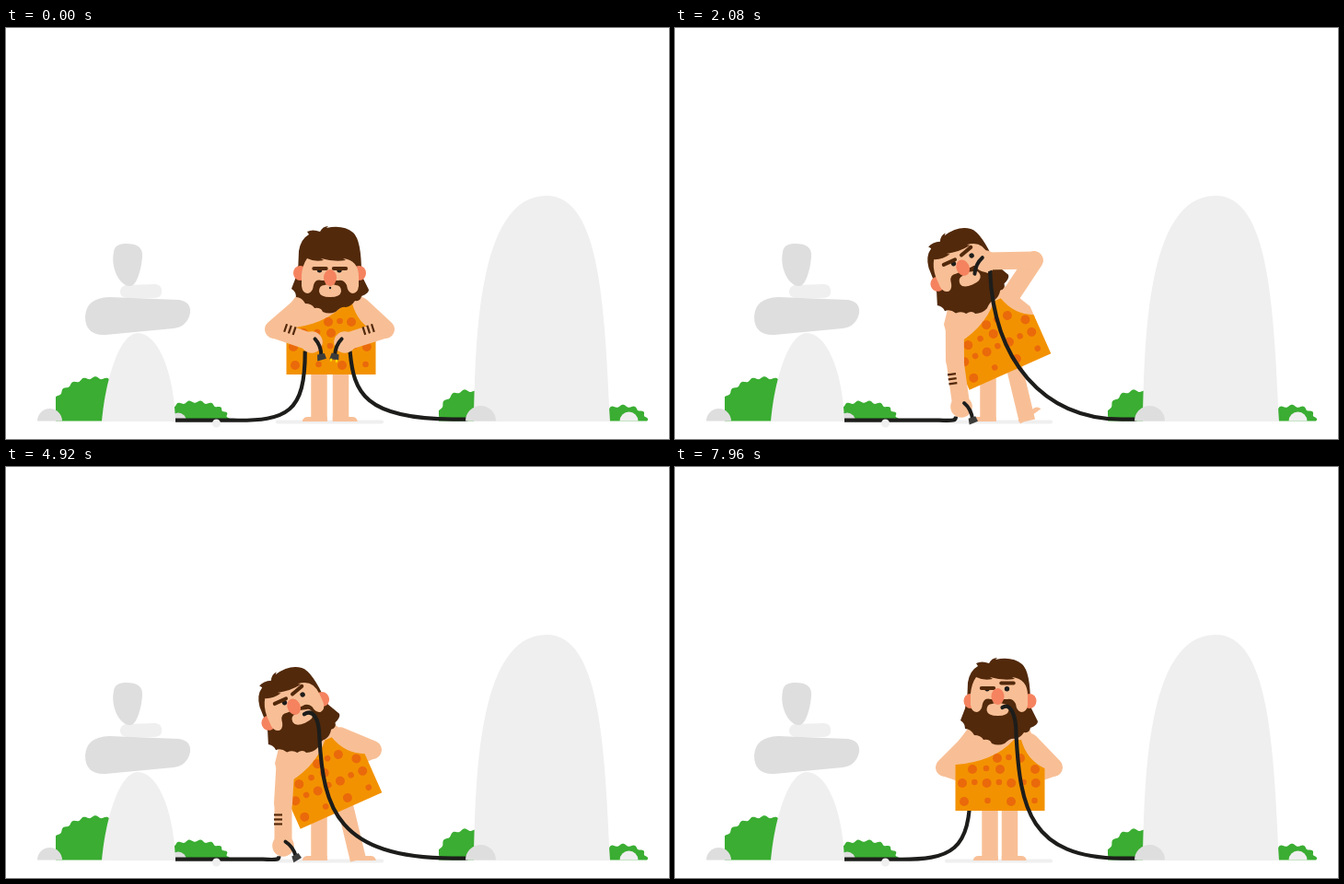
An HTML page with a canvas that plays this animation: 720 px wide and 446 px high, repeating every 8 s.

```html
<!DOCTYPE html>
<html lang="en">
<head>
<meta charset="utf-8">
<title>Caveman with cables</title>
<style>
html, body { margin: 0; width: 100%; height: 100%; overflow: hidden; background: #fff; }
canvas { display: block; width: 720px; height: 446px; }
</style>
</head>
<body>
<canvas id="stage"></canvas>
<script>
const LOOP = 8000, GROUND = 426.5;
const SKIN = '#f8bf96', HAIR = '#52290b', PINK = '#f5835f', TUNIC = '#f39200', SPOT = '#ea690b';
const PALE = '#efefef', STONE = '#dedede', LEAF = '#3aad32', BLACK = '#1d1d1b', CLAMP = '#3c3c3b';

const canvas = document.getElementById('stage');
const ratio = window.devicePixelRatio || 1;
canvas.width = 720 * ratio;
canvas.height = 446 * ratio;
const ctx = canvas.getContext('2d');

// ---------- drawing helpers ----------
const radians = degrees => degrees * Math.PI / 180;
const polar = (length, degrees) => [length * Math.cos(radians(degrees)), length * Math.sin(radians(degrees))];
const add = (a, b) => [a[0] + b[0], a[1] + b[1]];

function fill(path, color) {
  ctx.fillStyle = color;
  ctx.fill(new Path2D(path));
}
function stroke(path, color, width, cap = 'round') {
  ctx.strokeStyle = color;
  ctx.lineWidth = width;
  ctx.lineCap = cap;
  ctx.stroke(new Path2D(path));
}
function line(a, b, color, width, cap) {
  stroke(`M${a}L${b}`, color, width, cap);
}
function oval(x, y, rx, color, ry = rx) {
  ctx.fillStyle = color;
  ctx.beginPath();
  ctx.ellipse(x, y, rx, ry, 0, 0, Math.PI * 2);
  ctx.fill();
}
function dome(x, r, color) {
  fill(`M${x - r} ${GROUND}A${r} ${r} 0 0 1 ${x + r} ${GROUND}Z`, color);
}
function group([x, y], degrees, draw) {
  ctx.save();
  ctx.translate(x, y);
  ctx.rotate(radians(degrees));
  draw();
  ctx.restore();
}

// ---------- poses; tips are the directions of the cable ends ----------
const spark = {
  lean: 0, look: 1, toe: 0, slack: 15, mouth: 0, band: -1,
  elbowL: [291, 327], handL: [332, 341], tipL: 55,
  elbowR: [412, 327], handR: [368, 341], tipR: 127,
  browL: 0, browR: 0, tilt: 0, eyes: 0, turn: 0
};
const raise = {
  ...spark, lean: 1, look: 0, toe: 1, slack: 57, mouth: -3, band: 1,
  elbowL: [304, 361], handL: [311, 411], tipL: 48,
  elbowR: [364, 241], handR: [338, 204], tipR: 130,
  browL: 1.5, browR: 5, tilt: -16, eyes: 4
};
const lick = { ...raise, mouth: 2, elbowR: [390, 252], handR: [337, 253] };
const show = { ...lick, band: 1.7, elbowL: [280, 357], handL: [251, 320], tipL: -124, browL: 3, eyes: 2.5 };
const fling = { ...show, slack: 40, toe: .4, elbowL: [295, 362], handL: [285, 375], tipL: -30, handR: [420, 212] };
const point = {
  ...raise, toe: 0, slack: 20, mouth: 4,
  elbowL: [308, 365], handL: [316, 409], tipL: 70, elbowR: [406, 286], handR: [447, 311]
};
const rest = { ...point, elbowL: [301, 365], handL: [301, 411], tipL: 40, elbowR: [398, 307], handR: [372, 318] };
const stand = { ...spark, look: 0, elbowL: [293, 326], handL: [328, 338], elbowR: [411, 326], handR: [377, 338] };
const wink = { ...stand, mouth: -1.5, turn: -1.5, browL: -1, browR: 4.5 };

// each pose is held from start to end, with easing in between
const beats = [
  [0, 280, spark], [760, 1420, raise], [1680, 2560, lick], [2860, 3380, show], [3620, 3620, fling],
  [3900, 4200, point], [4900, 5900, rest], [6400, 7280, stand], [7560, LOOP, wink]
];
const ease = k => k < .5 ? 4 * k ** 3 : 1 - (2 - 2 * k) ** 3 / 2;
const mix = (a, b, k) => Array.isArray(a) ? a.map((v, i) => mix(v, b[i], k)) : a + (b - a) * k;

function poseAt(t) {
  const i = beats.findIndex(beat => t < beat[1]);
  const [start, , pose] = beats[i];
  if (t >= start) return pose;
  const [, end, before] = beats[i - 1];
  const k = ease((t - end) / (start - end));
  return Object.fromEntries(Object.keys(pose).map(name => [name, mix(before[name], pose[name], k)]));
}

// ---------- scenery ----------
function drawBush(cx, rx, height, minX) {
  ctx.fillStyle = LEAF;
  ctx.beginPath();
  ctx.moveTo(minX, GROUND);
  for (let a = Math.PI; a > 0; a -= .02) {
    const ripple = 1.3 * Math.sin(a * Math.round(rx / 2));
    ctx.lineTo(Math.max(minX, cx + (rx + ripple) * Math.cos(a)), GROUND - (height + ripple) * Math.sin(a));
  }
  ctx.lineTo(cx + rx, GROUND);
  ctx.fill();
}
function drawScenery() {
  drawBush(97, 50, 47, 54);
  drawBush(205, 37, 21, 183);
  drawBush(501, 32, 33, 470);
  drawBush(670, 26, 16.5, 650);
  dome(187, 9, STONE);
  dome(47.5, 13.5, STONE);
  fill('M104 427C108 380 124 331 143 331C164 331 182 370 184 427Z', PALE);
  fill('M130 279L162 278Q170 278 169 288Q168 293 160 293H132Q123 292 124 285Q125 280 130 279Z', PALE);
  fill('M86 313Q87 293 112 292L188 295Q201 297 200 309Q197 324 182 326L108 333Q86 334 86 313Z', STONE);
  fill('M117 243C118 236 123 234 131 234C142 234 149 238 148 248C147 262 142 280 135 280C125 281 113 262 117 243Z', STONE);
  fill('M508 427C510 350 510 182 587 182C645 182 650 300 656 427Z', PALE);
  dome(676.5, 10, PALE);
  line([295, 427.5], [408, 427.5], PALE, 4);
}

// ---------- figure ----------
function drawFoot(x, dir, lift) {
  group([x - 5 * dir, 427], -36 * lift, () =>
    fill(`M${-3.7 * dir} 0h${27 * dir}q${-dir} -5 ${-6 * dir} -5h${-21 * dir}Z`, SKIN));
}
function drawLegs({ lean, toe, look }) {
  const left = 342 - 2 * Math.max(lean, look), ankle = 363.5 + 20 * lean;
  line([left, 360], [left, 427], SKIN, 17.5, 'butt');
  drawFoot(left, -1, 0);
  line([363.5 + 3 * lean, 360], [ankle - lean, 426.5], SKIN, 17.5, 'butt');
  drawFoot(ankle, 1, toe);
}
function drawSpots(x, y, step, count) {
  for (let i = 0; i < count; i++) oval(x + i * step, y - i % 2, i % 2 ? 3.3 : 5, SPOT);
}
function drawTunic() {
  fill('M318 284L308 297L304.5 324V330H401.5V317L384 283Z', SKIN);
  fill('M304.5 373V323Q346 320 368 296H376Q382 318 401.5 327V373Z', TUNIC);
  drawSpots(314, 363, 25.5, 4);
  drawSpots(312, 343, 13.3, 7);
  drawSpots(323, 328, 15, 3);
  drawSpots(350, 316, 12.5, 3);
  drawSpots(391, 328, 0, 1);
}
function drawFace({ browL, browR, tilt, eyes, turn, mouth }, t) {
  fill('M321 258V246Q322 235 327 228Q335 232 345 230L342 228Q356 232 369 230L366 228Q383 230 383 248V258Q382 266 376 266Q371 265 370 257Q367 251 361 252H343Q336 250 334 257Q333 265 328 266Q322 266 321 258Z', SKIN);
  [[340.5, browL, 0], [362, browR, tilt]].forEach(([x, lift, angle]) => {
    oval(x + turn + eyes, 240.8, 2.7, BLACK);
    group([x + turn + .5, 239 - lift], angle, () => line([-6.7, 0], [6.7, 0], HAIR, 4));
  });
  group([mouth, 0], 0, () => {
    fill('M340 264Q340 257 346 257L352 255L358 257Q364 257 364 264Q363 270 352 270Q341 270 340 264Z', SKIN);
    if (t < 600) oval(352, 260, 1.2, BLACK);
  });
  if (t > 850 && t < 1600) oval(341.5, 255, 4.2, '#f00', 2.6);
  oval(352 + turn, 249, 7, PINK, 9);
}
function drawHead(pose, t) {
  const { look, turn } = pose;
  fill('M317 258L318 234Q320 221 329 216L327 213Q333 210 341 213Q344 207 350 207L348 209Q366 205 377 214Q386 222 386 258Z', HAIR);
  fill('M317 250L315 262L310 275Q315 278 315 284Q321 284 325 291Q332 291 335 296Q342 295 344 300Q351 303 358 300Q364 294 369 295Q375 294 379 288Q385 289 386 283Q394 280 394 276L387 262L386 250Z', HAIR);
  [319.5, 383.5].forEach(x => oval(x - turn, 254 + 4 * look, 7.5, PINK, 8));
  group([0, 14 * look], 0, () => drawFace(pose, t));
}
function drawForearm(elbow, hand) {
  line(elbow, hand, SKIN, 19);
  oval(...hand, 11.8, SKIN);
}
function drawBands(elbow, hand, side) {
  const half = Math.min(4.5, 9.5 - 5 * Math.abs(side));
  const angle = Math.atan2(hand[1] - elbow[1], hand[0] - elbow[0]) * 180 / Math.PI;
  group(mix(elbow, hand, .38), angle, () => [-5, 0, 5].forEach(x =>
    line([x, 5.5 * side - half], [x, 5.5 * side + half], HAIR, 2.2, 'butt')));
}
function drawFingers(hand) {
  line(add(hand, [2, -8]), add(hand, [2, -25]), SKIN, 6.5);
  line(add(hand, [6, -6]), add(hand, [15, -21]), SKIN, 6.5);
}

// ---------- cables ----------
function drawTip(hand, angle, bend, clamp, wires) {
  const end = polar(18, angle);
  group(hand, 0, () => {
    stroke(`M${polar(5, angle + 100 * bend)}Q${polar(11, angle + 35 * bend)} ${end}`, BLACK, 4);
    if (clamp) group(end, angle - 25 * bend, () => {
      fill('M-2 -4L4 -5L5 5L-2 4Z', CLAMP);
      if (wires) [-3, 3].forEach(y => line([4, y], [7, y], '#ffde00', 2, 'butt'));
    });
  });
}
function drawLeftCable([x, y]) {
  const rise = GROUND - y;
  stroke(`M184 425.7H${x - 14 - rise * .85}C${x - rise * .25} 426.5 ${x} ${GROUND - rise * .12} ${x} ${y}`, BLACK, 4.2, 'butt');
}
function drawRightCable([x, y], slack, mouth) {
  const hook = mouth ? `C${x} ${y - 20} ${mouth[0] + 9} ${mouth[1] - 6} ${mouth}` : '';
  stroke(`M500 424.7H485C${x + slack} 424 ${x + 4} ${y + .6 * (424 - y)} ${x} ${y}${hook}`, BLACK, 4.2);
}

function drawScene(t) {
  const pose = poseAt(t);
  const { lean, look, turn, elbowL, handL, tipL, elbowR, handR, tipR } = pose;
  const hip = [353 + 11 * lean, 373 + 3 * look], angle = -24 * lean;
  const place = (x, y) => {
    const dx = x - 353, dy = y - 373;
    return add(hip, polar(Math.hypot(dx, dy), angle + Math.atan2(dy, dx) * 180 / Math.PI));
  };
  const inBody = (dy, draw) => group(hip, angle, () => group([-353, dy - 373], 0, draw));
  const shoulderL = place(320, 299), shoulderR = place(385, 299);
  const hiddenL = t > 6150, hiddenR = t > 4550, plugged = t > 3400;
  const leftCable = () => drawLeftCable(add(handL, polar(12, tipL + 72)));

  ctx.setTransform(ratio, 0, 0, ratio, 0, 0);
  ctx.clearRect(0, 0, 720, 446);
  drawScenery();

  if (hiddenL) {
    leftCable();
    line(shoulderL, elbowL, SKIN, 20);
    drawForearm(elbowL, handL);
  }
  drawLegs(pose);
  line(shoulderR, elbowR, SKIN, 20);
  if (hiddenR) drawForearm(elbowR, handR);
  inBody(0, drawTunic);
  if (!hiddenL) line(shoulderL, elbowL, SKIN, 20);
  inBody(5 * look, () => drawHead(pose, t));

  if (!hiddenL) leftCable();
  if (plugged) drawRightCable(place(372 - 8 * lean + turn, 290), pose.slack, place(357 + 2 * lean + turn, 261));
  else drawRightCable(add(handR, polar(12, tipR - 65)), pose.slack);

  if (!hiddenL) {
    drawForearm(elbowL, handL);
    if (t > 2720 && t < 3500) drawFingers(handL);
    drawBands(elbowL, handL, pose.band);
    drawTip(handL, tipL, -1, true, false);
  }
  if (!hiddenR) {
    drawForearm(elbowR, handR);
    if (t < 480 || t > 3560) drawBands(elbowR, handR, 1);
    if (!plugged) drawTip(handR, tipR, 1, t < 1640, true);
  }
  dome(515.5, 16.5, STONE);
  oval(228.5, 429, 4.5, PALE);
}

function tick() {
  drawScene(performance.now() % LOOP);
  requestAnimationFrame(tick);
}
tick();
</script>
</body>
</html>
```
